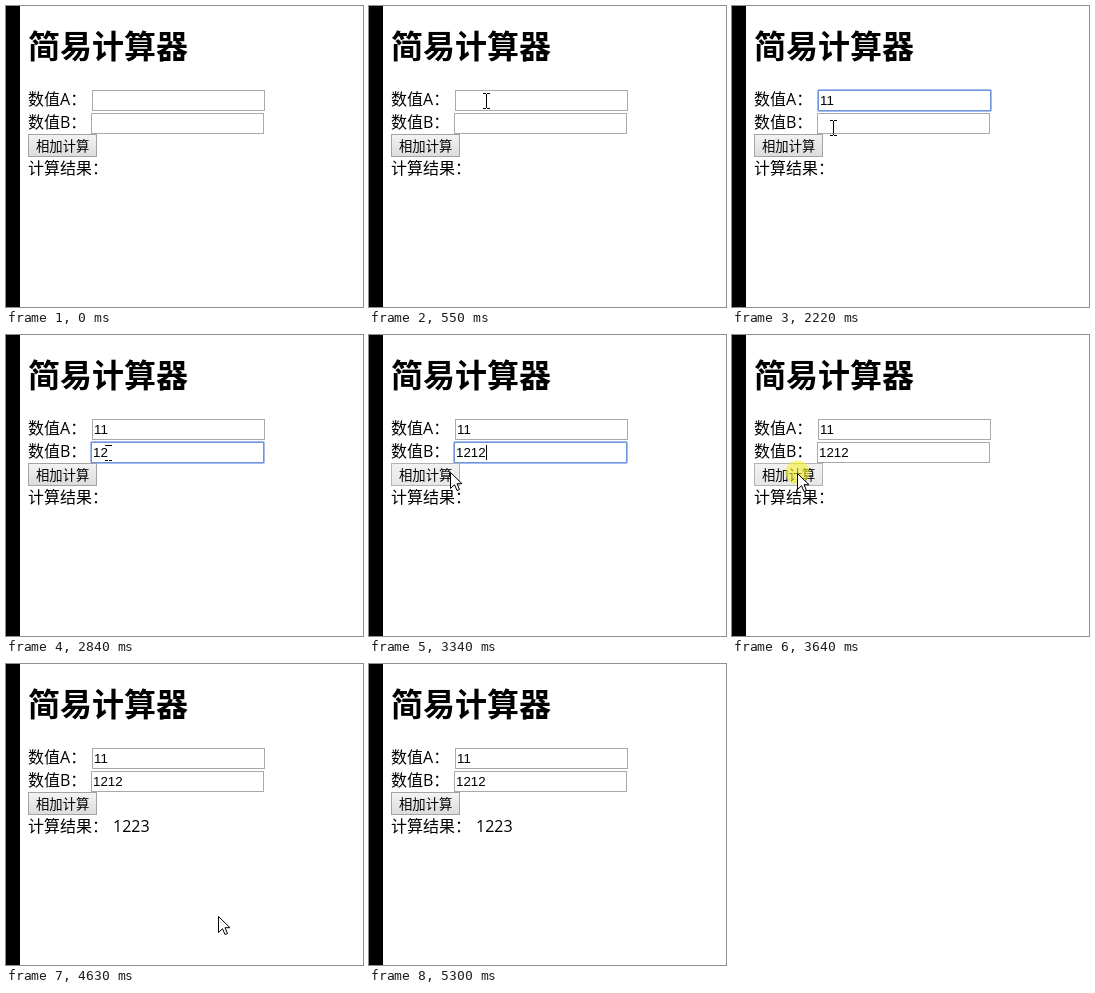
Animation, 357 px wide and 301 px high, one loop 5750 ms. Source, as an HTML page:

```html
<!DOCTYPE html>
<html lang="zh-CN">
<head>
<meta charset="utf-8">
<title>简易计算器</title>
<style>
html, body { margin: 0; width: 100%; height: 100%; overflow: hidden; background: #fff; }
svg { display: block; font: 16px "Open Sans", "Noto Sans CJK SC", "Noto Sans CJK", sans-serif; }
.title { font-size: 32px; font-weight: bold; }
.box { fill: #fff; stroke: #a9a9a9; }
.ring { fill: none; stroke: #a3bcf0; }
.focus .box { stroke: #6f96dd; }
.field text { font: 13.33px "Liberation Sans", Arial, sans-serif; }
#button rect { fill: url(#face); stroke: #a3a3a3; }
#button.hover rect { fill: url(#light); stroke: #b4b4b4; }
#button text { font-size: 13.33px; }
#beam { fill: #fff; mix-blend-mode: difference; }
</style>
</head>
<body>
<svg width="357" height="301" viewBox="0 0 357 301">
  <defs>
    <linearGradient id="face" x2="0" y2="1"><stop stop-color="#f3f3f3"/><stop offset="1" stop-color="#dcdcdc"/></linearGradient>
    <linearGradient id="light" x2="0" y2="1"><stop stop-color="#f2f2f2"/><stop offset="1" stop-color="#e6e6e6"/></linearGradient>
  </defs>
  <rect width="357" height="301" fill="#fff"/>
  <rect width="14" height="301"/>
  <text class="title" x="22" y="52">简易计算器</text>
  <text x="22" y="99">数值A：</text>
  <text x="22" y="122">数值B：</text>
  <text x="22" y="168">计算结果：</text>
  <text id="result" x="107" y="168"></text>
  <g id="fields"></g>
  <g id="button">
    <rect x="22.5" y="128.5" width="68" height="22"/>
    <text x="30" y="145">相加计算</text>
  </g>
  <circle id="click" cx="65.5" cy="137.5" r="12" fill="#f3ee2c" opacity=".6"/>
  <path id="arrow" d="M.5 .5V16.5L4.5 12.7 7 18.5 9.5 17.5 7 11.7H12Z" fill="#fff" stroke="#000"/>
  <path id="beam" d="M-3 -8h3v1h-3zM1 -8h3v1h-3zM0 -7h1v14h-1zM-3 7h3v1h-3zM1 7h3v1h-3z"/>
</svg>
<script>
const LOOP = 5750, FRAME = 62, KEY_GAP = 180, PRESS = 3640, RELEASE = 3710;
const $ = id => document.getElementById(id);
const show = (el, on) => el.style.display = on ? '' : 'none';

const fields = [
  { x: 86, y: 84, value: '11', focus: 660, type: 1470, blur: 2400 },
  { x: 85, y: 107, value: '1212', focus: 2400, type: 2660, blur: PRESS }
];

// Each glide starts where the last one ended, unless it has its own start;
// dip bends the straight line downwards.
const glides = [
  { start: 60, end: 550, from: [218, 247], to: [117, 95] },
  { start: 910, end: 1160, to: [144, 117] },
  { start: 1400, end: 1970, to: [97, 134], dip: 12 },
  { start: 2030, end: 2280, to: [102, 118] },
  { start: 3090, end: 3520, to: [65, 138], dip: 8 },
  { start: RELEASE, end: 4150, to: [171, 183] },
  { start: 4330, end: 4760, to: [242, 302] },
  { start: 5120, end: 5300, from: [212, 280], to: [187, 302], dip: -8 }
];

function pointer(t) {
  const i = glides.findLastIndex(g => t >= g.start);
  if (i < 0) return [-50, -50];
  const { start, end, to, from = glides[i - 1].to, dip = 0 } = glides[i];
  if (t >= end) return to;
  const u = Math.floor((t - start) / FRAME) * FRAME / (end - start);
  const [x, y] = from.map((v, j) => v + (to[j] - v) * u);
  return [Math.round(x), Math.round(y + dip * Math.sin(Math.PI * u))];
}

const inside = ([px, py], x, y, w, h) => px >= x && px < x + w && py >= y && py < y + h;

$('fields').innerHTML = fields.map(f => `
  <g class="field" transform="translate(${f.x} ${f.y})">
    <rect class="box" x=".5" y=".5" width="172" height="20"/>
    <rect class="ring" x="-.5" y="-.5" width="174" height="22" rx="1"/>
    <text x="2" y="15"></text>
    <path/>
  </g>`).join('');

function drawField(f, i, t) {
  const el = $('fields').children[i];
  const [, ring, text, caret] = el.children;
  const keys = Math.floor((t - f.type) / KEY_GAP) + 1;
  const count = Math.max(0, Math.min(f.value.length, keys));
  const touched = count ? f.type + (count - 1) * KEY_GAP : f.focus;
  const focused = t >= f.focus && t < f.blur;
  el.classList.toggle('focus', focused);
  show(ring, focused);
  show(caret, focused && (t - touched) % 1000 < 500);
  text.textContent = f.value.slice(0, count);
  caret.setAttribute('d', `M${Math.round(2 + count * 7.41)} 3h1v15h-1z`);
}

function draw(t) {
  fields.forEach((f, i) => drawField(f, i, t));

  const p = pointer(t);
  const overText = fields.some(f => inside(p, f.x, f.y, 173, 21));
  for (const id of ['arrow', 'beam']) $(id).setAttribute('transform', `translate(${p})`);
  show($('beam'), overText);
  show($('arrow'), !overText);

  show($('click'), t >= PRESS && t < RELEASE);
  $('button').classList.toggle('hover', inside(p, 22, 128, 69, 23));
  $('result').textContent = t < RELEASE ? '' : fields.reduce((sum, f) => sum + +f.value, 0);
}

const begin = performance.now();
function tick() {
  draw((performance.now() - begin) % LOOP);
  requestAnimationFrame(tick);
}
tick();
</script>
</body>
</html>
```
